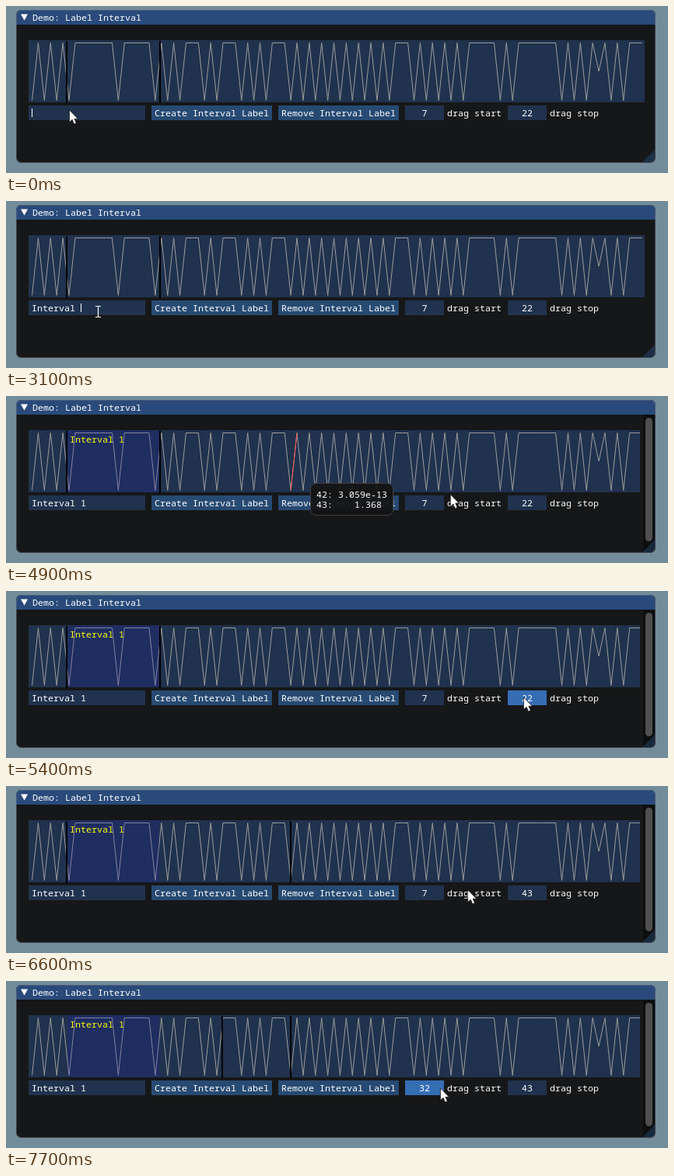
Recreate the animation shown at these times as an HTML page. Size 851 px wide and 215 px high, loop 8000 ms.

```html
<!DOCTYPE html>
<html lang="en">
<head>
<meta charset="utf-8">
<title>Label Interval</title>
<style>
  html, body { margin: 0; width: 100%; height: 100%; overflow: hidden; background: #738c99; }
  svg { display: block; width: 851px; height: 215px; }
  text { font: 11.667px "Noto Sans Mono", monospace; fill: #fff; white-space: pre; }
  .frame { fill: #20324d; }
  .button, .field-hover { fill: #274a72; }
  .hover { fill: #4296fa; }
  .active { fill: #0f87fa; }
  .field-active { fill: #366eb4; }
</style>
</head>
<body>
<svg viewBox="0 0 851 215">
  <defs>
    <clipPath id="view"><rect id="plotArea" x="29" y="44" width="792" height="80"/></clipPath>
  </defs>
  <rect width="851" height="215" fill="#738c99"/>
  <rect x="13" y="5" width="822" height="197" rx="7" fill="#161718"/>
  <path d="M13 24V12Q13 5 20 5H828Q835 5 835 12V24Z" fill="#294a7a"/>
  <path d="M19 10.6H28L23.5 18.4Z" fill="#fff"/>
  <text x="34" y="19">Demo: Label Interval</text>

  <g id="scroll">
    <path d="M819 24H834V195Q834 201 828 201H819Z" fill="#0d0e0e"/>
    <rect x="822" y="28" width="9" height="159" rx="4.5" fill="#4f4f4f"/>
  </g>
  <path d="M834 185V195Q834 201 828 201H818Z" fill="#4296fa" opacity=".2"/>
  <rect x="13.5" y="5.5" width="821" height="196" rx="7" fill="none" stroke="#6e6e80" stroke-opacity=".5"/>

  <g clip-path="url(#view)">
    <rect class="frame" x="29" y="44" width="792" height="80"/>
    <path id="curve" fill="none" stroke="#9c9c9c"/>
    <path id="hot" fill="none" stroke="#ff4d45"/>
  </g>
  <g id="label">
    <rect x="79" y="44" width="118" height="80" fill="#1b19b1" opacity=".2"/>
    <text x="82" y="60" style="fill:#ff0">Interval 1</text>
  </g>
  <rect id="startLine" y="45" width="2" height="80"/>
  <rect id="stopLine" y="45" width="2" height="80"/>

  <rect class="frame" x="29" y="128" width="150" height="19"/>
  <text id="input" x="33" y="142"></text>
  <rect id="caret" y="132" width="1" height="11" fill="#fff"/>
  <rect id="create" x="187" y="128" width="155" height="19"/>
  <text x="191" y="142">Create Interval Label</text>
  <rect class="button" x="350" y="128" width="155" height="19"/>
  <text x="354" y="142">Remove Interval Label</text>
  <rect id="startField" x="513" y="128" width="50" height="19"/>
  <text id="startText" x="538" y="142" text-anchor="middle"></text>
  <text x="567" y="142">drag start</text>
  <rect id="stopField" x="645" y="128" width="50" height="19"/>
  <text id="stopText" x="670" y="142" text-anchor="middle"></text>
  <text x="699" y="142">drag stop</text>

  <g id="tip">
    <rect x="391.5" y="112.5" width="106" height="41" rx="7" fill="#141414" fill-opacity=".94" stroke="#3d3f46"/>
    <text x="399" y="131">42: 3.059e-13</text>
    <text x="399" y="144">43:    1.368</text>
  </g>

  <path id="arrow" d="M-.5 0V15.6L3.1 12.3L5.5 18L8.3 16.8L5.9 11.3H10.5Z" fill="#fff" stroke="#111" stroke-width=".7"/>
  <path id="beam" d="M-3.5 -7H-1L0 -6.3L1 -7H3.5M0 -6.3V6.3M-3.5 7H-1L0 6.3L1 7H3.5" fill="none" stroke="#fff" stroke-width="1.2"/>
</svg>
<script>
const $ = id => document.getElementById(id);
const LOOP = 8000, STEP = 100, CLICK = 4500;
const show = (id, on) => $(id).setAttribute("visibility", on ? "visible" : "hidden");
const set = (id, name, value) => $(id).setAttribute(name, value);

// The signal dips at every second sample, except across these plateaus.
const plateaus = { 6: 14, 14: 20, 24: 28, 30: 34, 38: 42, 58: 62, 70: 76, 78: 86, 96: 100 };
const dips = new Set();
for (let i = 0; i < 100; i = plateaus[i] || i + 2) dips.add(i);
const point = i => {
  const y = i === 92 ? 84 : dips.has(i) ? 121.5 : 47.5;
  return `${(33.5 + i * 784 / 99).toFixed(2)} ${y}`;
};
set("curve", "d", "M" + Array.from({ length: 100 }, (_, i) => point(i)).join("L"));
set("hot", "d", `M${point(42)}L${point(43)}`);

const ease = (t, from, to) => {
  const u = Math.min(1, Math.max(0, (t - from) / (to - from)));
  return u * u * (3 - 2 * u);
};

const drags = {
  stop: { from: 5450, to: 6390, low: 22, high: 43 },
  start: { from: 7100, to: 7600, low: 7, high: 32 }
};
const dragValue = ({ from, to, low, high }, t) => Math.floor(low + (high - low) * ease(t, from, to));

// Pointer glides: from, to, end x, end y, upward bow.
const glides = [
  [300, 400, 84, 135.5, 0],
  [1000, 1100, 118.5, 142.5, 0],
  [3800, 4300, 223, 138, 6],
  [4640, 5010, 666, 137, 17],
  [drags.stop.from, drags.stop.to, 687, 137, 0],
  [6400, 6750, 534, 138, 4],
  [drags.start.from, drags.start.to, 559, 138, 0]
];

function pointerAt(t) {
  let x = 82, y = 134;
  for (const [from, to, endX, endY, bow] of glides) {
    const s = ease(t, from, to);
    x += (endX - x) * s;
    y += (endY - y) * s - bow * Math.sin(Math.PI * s);
  }
  return { x, y };
}

function isOver(id, { x, y }) {
  const [left, top, width, height] = ["x", "y", "width", "height"].map(name => +$(id).getAttribute(name));
  return x >= left && x < left + width && y >= top && y < top + height;
}

function drawField(name, t, pointer) {
  const drag = drags[name], field = name + "Field";
  const active = t >= drag.from - 50 && t < drag.to + 110;
  $(name + "Text").textContent = dragValue(drag, t);
  set(field, "class", active ? "field-active" : isOver(field, pointer) ? "field-hover" : "frame");
  // The marker trails the number by one step.
  set(name + "Line", "x", 21 + 8 * dragValue(drag, t - STEP));
}

function render(time) {
  const t = Math.floor(time % LOOP / STEP) * STEP;
  const pointer = pointerAt(t);

  const typed = Math.min(10, Math.max(0, Math.floor((t - 1900) / 150) + 1));
  $("input").textContent = "Interval 1".slice(0, typed);
  set("caret", "x", 33 + 7 * typed);
  show("caret", t < CLICK);
  set("create", "class", t === CLICK ? "active" : isOver("create", pointer) ? "hover" : "button");

  const made = t > CLICK;
  show("label", made);
  show("scroll", made);
  set("plotArea", "width", made ? 786 : 792);

  const overPlot = isOver("plotArea", pointerAt(t - STEP));
  show("tip", overPlot);
  show("hot", overPlot);

  drawField("stop", t, pointer);
  drawField("start", t, pointer);

  const beam = t >= 400 && pointer.x < 179;
  show("beam", beam);
  show("arrow", !beam);
  set(beam ? "beam" : "arrow", "transform", `translate(${pointer.x} ${pointer.y})`);
}

const begin = performance.now();
function tick() {
  render(performance.now() - begin);
  requestAnimationFrame(tick);
}
tick();
</script>
</body>
</html>
```
